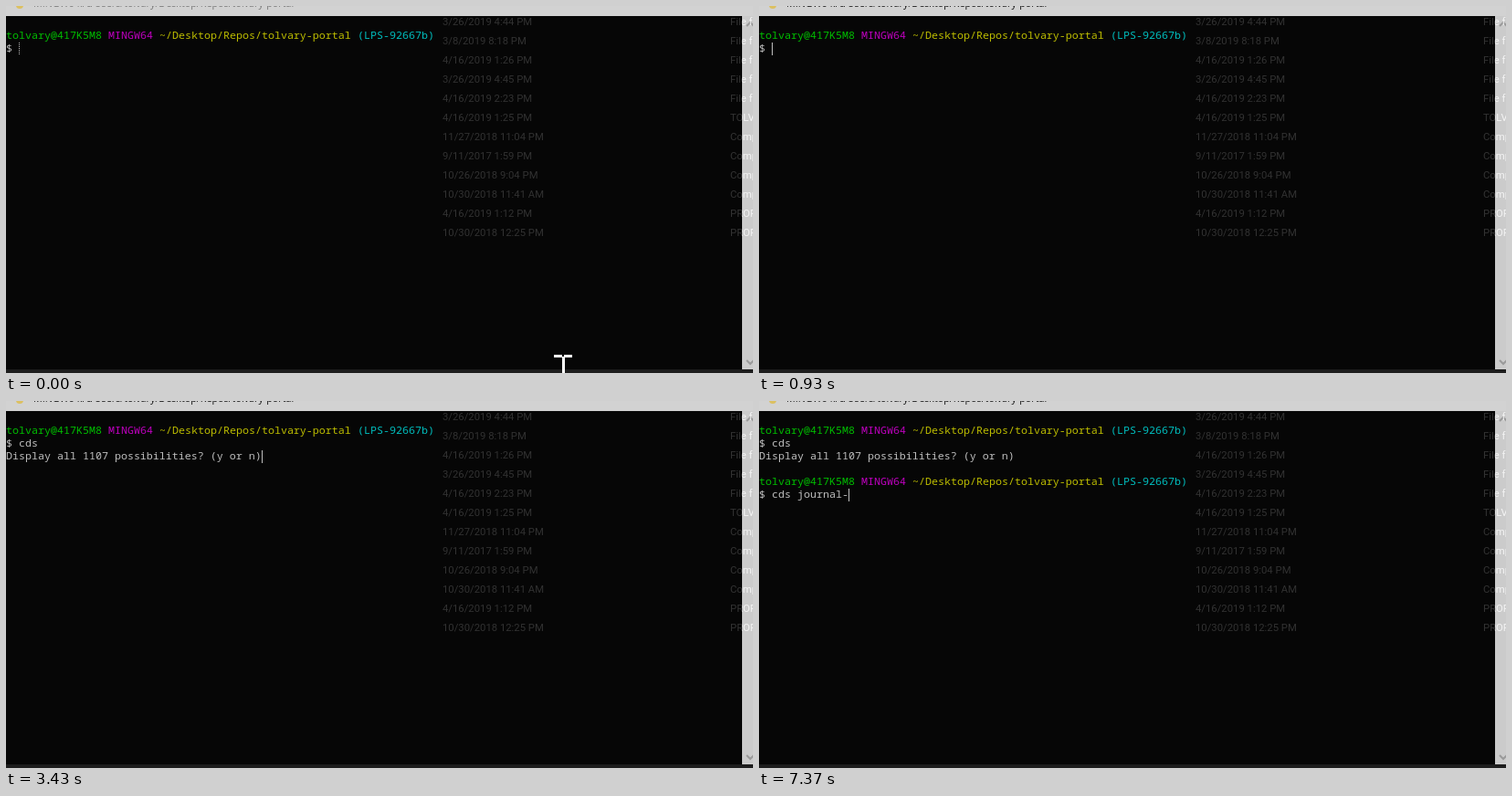
An HTML page with a canvas for the animation above (8 s loop, 818x402 px).

```html
<!DOCTYPE html>
<html>
<head>
<meta charset="utf-8">
<style>
  html, body { margin: 0; width: 100%; height: 100%; overflow: hidden; background: #060606; }
  canvas { display: block; }
</style>
</head>
<body>
<canvas id="stage" width="818" height="402"></canvas>
<script>
const ctx = document.getElementById('stage').getContext('2d');
const LOOP = 8000, CELL = 7, LINE = 14, TOP = 26;
const MONO = '11.667px "Noto Sans Mono", monospace';
const SANS = '11.3px Roboto, sans-serif';
const GREY = '#bfbfbf';

const files = [
  ['3/26/2019 4:44 PM', 'File folder'], ['3/8/2019 8:18 PM', 'File folder'],
  ['4/16/2019 1:26 PM', 'File folder'], ['3/26/2019 4:45 PM', 'File folder'],
  ['4/16/2019 2:23 PM', 'File folder'], ['4/16/2019 1:25 PM', 'TOLVARY File'],
  ['11/27/2018 11:04 PM', 'Compressed'], ['9/11/2017 1:59 PM', 'Compressed'],
  ['10/26/2018 9:04 PM', 'Compressed'], ['10/30/2018 11:41 AM', 'Compressed'],
  ['4/16/2019 1:12 PM', 'PROPERTIES File'], ['10/30/2018 12:25 PM', 'PROPERTIES File']
];

// What has been typed, by start time: [ms, row, text]
const typed = [
  [0, 1, '$ '], [1010, 1, '$ c'], [1080, 1, '$ cd'], [1160, 1, '$ cds'], [1630, 1, '$ cds '],
  [3430, 2, 'Display all 1107 possibilities? (y or n)'],
  [4060, 5, '$ '], [4130, 5, '$ cds '], [4980, 5, '$ cds j'], [5660, 5, '$ cds journal-']
];
const caretOff = [[680, 930], [2090, 2420], [3980, 4060], [4590, 4900], [6200, 6750], [7210, 7370]];

function rect(color, x, y, w, h) {
  ctx.fillStyle = color;
  ctx.fillRect(x, y, w, h);
}

function text(str, x, y, color, font) {
  ctx.font = font;
  ctx.fillStyle = color;
  ctx.fillText(str, x, y);
}

function cells(str, col, row, color) {
  text(str, col * CELL, TOP + row * LINE + 10, color, MONO);
}

function prompt(row) {
  cells('tolvary@417K5M8', 0, row, '#00bf00');
  cells('MINGW64', 16, row, '#bf00bf');
  cells('~/Desktop/Repos/tolvary-portal', 24, row, '#bfbf00');
  cells('(LPS-92667b)', 55, row, '#00bfbf');
}

function chevron(y, dir) {
  ctx.strokeStyle = '#9a9a9a';
  ctx.lineWidth = 2;
  ctx.beginPath();
  ctx.moveTo(811, y);
  ctx.lineTo(815, y + 4 * dir);
  ctx.lineTo(819, y);
  ctx.stroke();
}

function windowFrame(focused) {
  rect('#060606', 0, 0, 818, 402);
  rect('#d2d2d2', 0, 0, 818, 11);
  rect('#cbcbcb', 806, 11, 12, 387);
  rect('#1d1d1d', 0, 398, 818, 4);
  ctx.fillStyle = '#dcc060';
  ctx.beginPath();
  ctx.arc(15, -1, 4, 0, 7);
  ctx.fill();
  text('MINGW64:/c/Users/tolvary/Desktop/Repos/tolvary-portal', 30, 1,
    focused ? '#111' : '#777', '10.75px "Open Sans", sans-serif');
  chevron(22, -1);
  chevron(388, 1);

  const ghost = ctx.createLinearGradient(805.9, 0, 806.1, 0);
  ghost.addColorStop(0, '#323232');
  ghost.addColorStop(1, '#f4f4f4');
  files.forEach(([date, kind], i) => {
    text(date, 478, 21 + i * 21, '#323232', SANS);
    text(kind, 793, 21 + i * 21, ghost, SANS);
  });
}

function pointer(x, y, clicked) {
  if (clicked) {
    ctx.fillStyle = '#7d7900';
    ctx.beginPath();
    ctx.arc(365, 249, 30, 0, 7);
    ctx.fill();
  }
  const color = clicked ? '#ffffaa' : '#fff';
  for (const edge of [y, y + 31]) {
    rect(color, x - 10, edge, 9, 3);
    rect(color, x + 1, edge, 9, 3);
  }
  rect(color, x - 1, y + 2, 3, 30);
}

function draw(t) {
  const focused = t >= 150;
  windowFrame(focused);
  prompt(0);
  if (t >= 4060) prompt(4);

  const done = typed.filter(step => t >= step[0]);
  const rows = {};
  for (const [, row, str] of done) rows[row] = str;
  for (const row in rows) cells(rows[row], 0, +row, GREY);

  const [, row, str] = done[done.length - 1];
  const x = str.length * CELL, y = TOP + row * LINE;
  if (!focused) {
    for (let i = 0; i < LINE; i += 2) rect(GREY, x, y + i, 1, 1);
  } else if (!caretOff.some(([from, to]) => t >= from && t < to)) {
    rect(GREY, x, y, 1, LINE);
  }

  if (t < 70) pointer(610, 382, false);
  else if (t < 930) pointer(368, 234, t >= 150 && t < 220);
}

function tick() {
  draw(performance.now() % LOOP);
  requestAnimationFrame(tick);
}
tick();
</script>
</body>
</html>
```
